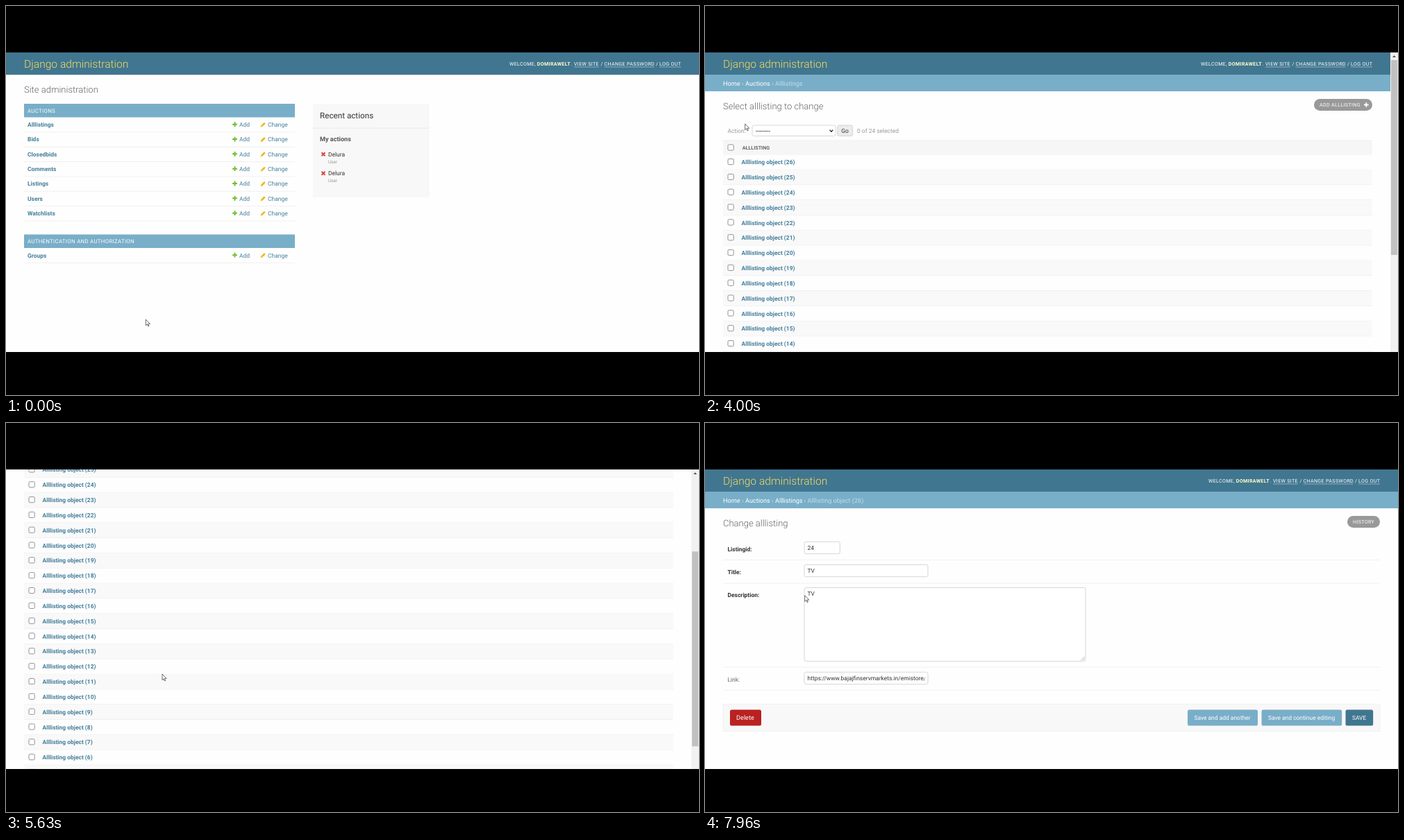
Animation of 998x561 px, one loop 8000 ms. Source, as an HTML page:

```html
<!DOCTYPE html>
<html lang="en">
<head>
<meta charset="utf-8">
<title>Admin walkthrough</title>
<style>
  html, body { margin: 0; width: 100%; height: 100%; overflow: hidden; background: #000; }
  svg { display: block; }
  text { font-family: Roboto, sans-serif; text-rendering: geometricPrecision; white-space: pre; }
  .caps { letter-spacing: .325px; }
  .hot { fill: #036; }
  .focus { text-decoration: underline; }
</style>
</head>
<body>
<svg id="stage" width="998" height="561" viewBox="0 0 998 561"></svg>
<script>
const LOOP = 8000, STEP = 100 / 3, ROWS = 24, PITCH = 21.83;
const LINK = '#447e9b', TEAL = '#417690', SKY = '#79aec8', LINE = '#eee';

const rect = (x, y, w, h, fill, more = '') =>
  `<rect x="${x}" y="${y}" width="${w}" height="${h}" fill="${fill}" ${more}/>`;
const text = (x, y, s, fill = '#333', size = 8.45, weight = 400, more = '') =>
  `<text x="${x}" y="${y}" fill="${fill}" font-size="${size}" font-weight="${weight}" ${more}>${s}</text>`;
const path = (d, stroke, width, more = '') =>
  `<path d="${d}" fill="none" stroke="${stroke}" stroke-width="${width}" ${more}/>`;
const rule = (x, y, w) => rect(x, y, w, .8, LINE);
const box = (x, y, w, h) => rect(x, y, w, h, '#fff', 'rx="2.4" stroke="#ccc" stroke-width=".8"');
const caps = (x, y, s, fill, size = 7.15, weight = 400) => text(x, y, s, fill, size, weight, 'class="caps"');
const plus = (x, y, r, color, width) => path(`M${x - r} ${y}h${2 * r}M${x} ${y - r}v${2 * r}`, color, width);

function header(right) {
  const tools = [['VIEW SITE', 154, 36], ['CHANGE PASSWORD', 110.5, 72], ['LOG OUT', 31, 31]];
  return rect(0, 66.5, 998, 32.7, TEAL) +
    text(26, 89, 'Django administration', '#f5dd5d', 15.6, 300) +
    caps(right - 247, 86, 'WELCOME,', '#fff') +
    caps(right - 207.3, 86, 'DOMIRAWELT', '#ffc', 7.15, 700) +
    caps(right - 158, 86, '.', '#fff') +
    caps(right - 115.5, 86, '/', '#fff') + caps(right - 36, 86, '/', '#fff') +
    tools.map(([s, x, w]) => caps(right - x, 86, s, '#fff') +
      rect(right - x, 87.6, w, .7, '#fff', 'opacity=".6"')).join('');
}

function crumbs(items) {
  return rect(0, 99, 998, 24, SKY) + items.map(([x, s], i) => {
    const last = i === items.length - 1;
    return text(x, 115, s, last ? '#c4dce8' : '#fff', 9.1) +
      (i ? text(x - 5, 115, '›', '#c4dce8', 9.1) : '');
  }).join('');
}

function module(y, title, names) {
  return rect(26, y, 390, 19.5, SKY) + caps(31, y + 12.6, title, '#fff', 7.8) +
    names.map((name, i) => {
      const mid = y + 30 + i * 21.33;
      return text(31, mid + 3, name, LINK, 8.45, 700, name === 'Alllistings' ? 'id="modelLink"' : '') +
        plus(329.5, mid - .3, 3.4, '#70bf2b', 2) + text(336, mid + 3, 'Add', LINK) +
        path(`M368.2 ${mid + 2.2}l4.6-4.6`, '#efb80b', 2.6) +
        path(`M367 ${mid + 3.4}l.6-2 1.4 1.4z`, '#efb80b', .7) +
        text(377, mid + 3, 'Change', LINK) + rule(26, mid + 10.5, 390);
    }).join('');
}

function homePage() {
  const action = y => path(`M454.5 ${y - 2.5}l5 5m0-5l-5 5`, '#dd4646', 2) +
    text(464, y + 3, 'Delura') + text(464, y + 12.8, 'User', '#999', 6.5);
  return header(972) + text(26, 124.6, 'Site administration', '#666', 13, 300) +
    module(141, 'AUCTIONS', ['Alllistings', 'Bids', 'Closedbids', 'Comments', 'Listings', 'Users', 'Watchlists']) +
    module(329.5, 'AUTHENTICATION AND AUTHORIZATION', ['Groups']) +
    rect(442, 141, 168, 135, '#f8f8f8') + text(452, 162, 'Recent actions', '#333', 11.7) +
    rect(442, 175.7, 168, .8, '#e6e6e6') + text(452, 195.2, 'My actions', '#555', 9.1, 700) +
    action(213.8) + action(241.3);
}

function listPage() {
  const check = y => rect(33, y - 4.7, 8.2, 8.2, '#fff', 'rx="1.6" stroke="#767676" stroke-width=".8"');
  let rows = '';
  for (let i = 0; i < ROWS; i++) {
    const top = 214.6 + i * PITCH, mid = top + 10.6;
    rows += rect(26, top, 935, PITCH, i % 2 ? '#f9f9f9' : '#fefefe') + rule(26, top + PITCH - .8, 935) +
      check(mid) + text(52.5, mid + 3, `Alllisting object (${26 - i})`, LINK, 8.45, 700, i ? '' : 'id="rowLink"');
  }
  return header(961) + crumbs([[26, 'Home'], [58, 'Auctions'], [101, 'Alllistings']]) +
    text(26, 148.6, 'Select alllisting to change', '#666', 13, 300) +
    rect(877, 134, 84, 17, '#999', 'rx="8.5"') + caps(885, 145.1, 'ADD ALLLISTING', '#fff') +
    plus(952.3, 142.5, 3.3, '#fff', 1.8) +
    text(32.5, 182.6, 'Action:', '#999') + box(68, 172, 120, 15.4) + text(73, 182.6, '---------', '#000') +
    path('M179.5 178.6l2.4 2.6 2.4-2.6', '#222', 1.3) +
    rect(190.8, 172, 21.8, 15.4, '#ececec', 'rx="2.4" stroke="#ccc" stroke-width=".8"') +
    text(196.3, 182.8, 'Go') + text(219, 182.6, '0 of 24 selected', '#999') +
    rect(26, 193.6, 935, 21, '#f6f6f6') + rule(26, 193.6, 935) + rule(26, 213.9, 935) +
    check(204.6) + text(53.8, 206.8, 'ALLLISTING', '#666', 7.15, 700) +
    rows + text(32.5, 754, '24 alllistings', '#666');
}

function formPage() {
  const label = (y, s, weight = 700, fill = '#333') => text(32.5, y, s, fill, 8.45, weight);
  const button = (x, w, s, inset, fill, size = 8.45) =>
    rect(x, 413.5, w, 23, fill, 'rx="2.6"') + text(x + inset, 427.8, s, '#fff', size);
  return header(972) +
    crumbs([[26, 'Home'], [58, 'Auctions'], [101, 'Alllistings'], [147.5, 'Alllisting object (26)']]) +
    text(26, 148.6, 'Change alllisting', '#666', 13, 300) +
    rect(925, 134, 47, 17, '#999', 'rx="8.5"') + caps(933, 145.1, 'HISTORY', '#fff') +
    label(185, 'Listingid:') + box(143, 171.3, 51.3, 17.4) + text(147.5, 183.2, '24') +
    label(217.8, 'Title:') + box(143, 204.3, 178, 17.4) + text(147.5, 216.2, 'TV') +
    label(251, 'Description:') + box(143, 237.4, 405, 106.2) + text(147.5, 249.4, 'TV') +
    path('M541.5 342.3l5-5m-2.2 5l2.2-2.2', '#777', .6) +
    label(372.6, 'Link:', 400, '#666') + box(143, 359.3, 178, 17.4) +
    text(147.5, 370.8, 'https://www.bajajfinservmarkets.in/emistore/', '#333', 8.45, 400, 'clip-path="url(#field)"') +
    [197.3, 230.8, 351.7, 384.8].map(y => rule(26, y, 946)).join('') +
    rect(26, 405.3, 946, 39.2, '#f8f8f8', `stroke="${LINE}" stroke-width=".7"`) +
    button(36, 45, 'Delete', 9.1, '#ba2121', 9.1) +
    button(695, 101, 'Save and add another', 9.4, SKY) +
    button(801.5, 115.7, 'Save and continue editing', 9.4, SKY) +
    button(922.5, 39.7, 'SAVE', 9.4, TEAL);
}

const $ = id => document.getElementById(id);
$('stage').innerHTML = `
  <clipPath id="view"><rect y="67" width="998" height="432"/></clipPath>
  <clipPath id="field"><rect x="143" y="360" width="173.6" height="16"/></clipPath>
  <g clip-path="url(#view)">
    ${rect(0, 66, 998, 434, '#fefefe')}
    <g id="home">${homePage()}</g>
    <g id="list"><g id="scroller">${listPage()}</g>
      ${rect(987, 66, 11, 434, '#f1f1f1')}
      <path d="M990 74l2.5-2.8 2.5 2.8z" fill="#505050"/>
      ${rect(988, 78, 9, 281, '#c1c1c1', 'id="thumb"')}
    </g>
    <g id="form">${formPage()}</g>
    <g id="cursor" fill="#fff" stroke="#222" stroke-width=".65" stroke-linejoin="round">
      <path id="arrow" d="M0 0v8.7l2-1.9 1.4 3.2 1.3-.6-1.4-3h2.8z"/>
      <path id="hand" d="M-1 .6q1-1.2 2 0v3.2l3.1.7q1 .3 1 1.3l-.8 5.7h-4.6l-3-4.2q.2-1.2 1.2-.6l1.1 1z"/>
    </g>
  </g>`;

// Keys are [time, ...values].
const pointer = [
  [0, 201.3, 452], [500, 201.3, 452], [866, 50.5, 119.5], [1133, 50.5, 119.5],
  [1350, 27.5, 84], [1660, 200, 76], [1966, 64.5, 72], [1980, 64.5, 72], [2433, 170.5, 69.5],
  [2700, 170.5, 69.5], [2733, 129.3, 107.3], [3200, 56, 168], [3970, 56, 168],
  [4480, 225, 362], [5900, 225, 362], [6600, 110, 231.5], [6633, 110, 231.5], [6766, 108, 229.5],
  [7570, 108, 229.5], [7960, 143.7, 248.7], [LOOP, 143.7, 248.7]
];
const scroll = [
  [0, 0], [4970, 0], [5166, 174], [5330, 275], [5520, 275], [5633, 179.8], [5833, 10.5], [5890, 0], [LOOP, 0]
];
const smooth = u => u * u * (3 - 2 * u);

function at(keys, t, ease = u => u) {
  const i = keys.findIndex(k => k[0] > t), a = keys[i - 1], b = keys[i];
  const u = ease((t - a[0]) / (b[0] - a[0]));
  return a.slice(1).map((v, j) => v + (b[j + 1] - v) * u);
}
const show = (id, on) => $(id).style.display = on ? '' : 'none';

function draw(now) {
  const t = Math.floor((now + 7) % LOOP / STEP) * STEP;
  const page = t < 4000 ? 'home' : t < 7600 ? 'list' : 'form';
  for (const id of ['home', 'list', 'form']) show(id, id === page);

  const [y] = at(scroll, t);
  $('scroller').setAttribute('transform', `translate(0 ${-y})`);
  $('thumb').setAttribute('y', 78 + y / 1.673);

  const overModel = t >= 3140 && t < 4000, overRow = t >= 6660 && t < 7600;
  $('modelLink').classList.toggle('hot', overModel);
  $('modelLink').classList.toggle('focus', overModel && t >= 3460);
  $('rowLink').classList.toggle('hot', overRow);
  $('rowLink').classList.toggle('focus', overRow && t >= 6960);

  show('hand', overModel || overRow);
  show('arrow', !overModel && !overRow);
  $('cursor').setAttribute('transform', `translate(${at(pointer, t, smooth)})`);
  requestAnimationFrame(draw);
}
draw(0);
</script>
</body>
</html>
```
